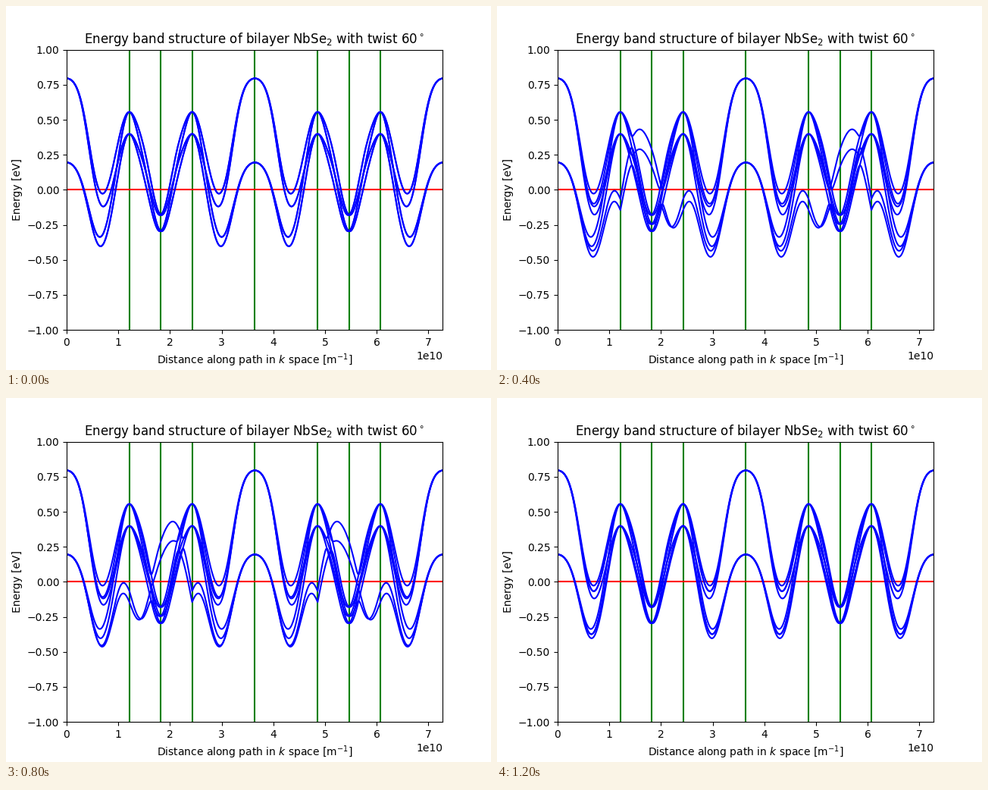
Animation, 640 px wide and 480 px high, one loop 1300 ms. Source, as a matplotlib script:

```python
import numpy as np
import matplotlib.pyplot as plt
from matplotlib.animation import FuncAnimation

A = 3.45e-10                 # lattice constant [m]
K = 4 * np.pi / 3            # length of Gamma-K in units of 1/A
STEPS, TWIST = 13, 60
SPIN_ORBIT, INTERLAYER = 0.0784, 0.3         # [eV]
R3 = np.sqrt(3)

# Three-orbital hoppings up to third neighbours [eV]
e0, e1 = 1.4466, 1.8496
t0, t1, t2, t11, t12, t22 = -0.2308, 0.3116, 0.3459, 0.2795, 0.2787, -0.0539
r0, r1, r2, r11, r12 = 0.0037, -0.0997, 0.0385, 0.0320, 0.0986
u0, u1, u2, u11, u12, u22 = 0.0685, -0.0381, 0.0535, 0.0601, -0.0179, -0.0425


def layer(k, spin):
    """Monolayer Hamiltonian for the orbitals z2, xy and x2-y2."""
    a, b = k.real / 2, R3 * k.imag / 2
    ca, c2a, c3a, c4a = (np.cos(n * a) for n in (1, 2, 3, 4))
    sa, s2a, s3a = (np.sin(n * a) for n in (1, 2, 3))
    cb, c2b, sb, s2b = np.cos(b), np.cos(2 * b), np.sin(b), np.sin(2 * b)

    h = np.zeros((len(k), 3, 3), complex)
    h[:, 0, 0] = (e0 + 2 * t0 * (2 * ca * cb + c2a)
                  + 2 * r0 * (2 * c3a * cb + c2b)
                  + 2 * u0 * (2 * c2a * c2b + c4a))
    h[:, 0, 1] = (-2 * R3 * t2 * sa * sb + 2 * (r1 + r2) * s3a * sb
                  - 2 * R3 * u2 * s2a * s2b
                  + 1j * (2 * t1 * sa * (2 * ca + cb)
                          + 2 * (r1 - r2) * s3a * cb
                          + 2 * u1 * s2a * (2 * c2a + c2b)))
    h[:, 0, 2] = (2 * t2 * (c2a - ca * cb)
                  - 2 / R3 * (r1 + r2) * (c3a * cb - c2b)
                  + 2 * u2 * (c4a - c2a * c2b)
                  + 1j * (2 * R3 * t1 * ca * sb
                          + 2 / R3 * (r1 - r2) * sb * (c3a + 2 * cb)
                          + 2 * R3 * u1 * c2a * s2b))
    h[:, 1, 1] = (e1 + (t11 + 3 * t22) * ca * cb + 2 * t11 * c2a
                  + 4 * r11 * c3a * cb + 2 * (r11 + R3 * r12) * c2b
                  + (u11 + 3 * u22) * c2a * c2b + 2 * u11 * c4a)
    h[:, 2, 2] = (e1 + (3 * t11 + t22) * ca * cb + 2 * t22 * c2a
                  + 2 * r11 * (2 * c3a * cb + c2b)
                  + 2 / R3 * r12 * (4 * c3a * cb - c2b)
                  + (3 * u11 + u22) * c2a * c2b + 2 * u22 * c4a)
    h[:, 1, 2] = (R3 * (t22 - t11) * sa * sb + 4 * r12 * s3a * sb
                  + R3 * (u22 - u11) * s2a * s2b
                  + 1j * (4 * t12 * sa * (ca - cb)
                          + 4 * u12 * s2a * (c2a - c2b))
                  - 1j * spin * SPIN_ORBIT)
    for i, j in ((0, 1), (0, 2), (1, 2)):
        h[:, j, i] = h[:, i, j].conj()
    return h


def bands(k, deg):
    """Lowest two bands per spin of two z2-coupled layers, one twisted."""
    q = k * np.exp(-1j * np.radians(deg))
    out = []
    for spin in (1, -1):
        h = np.zeros((len(k), 6, 6), complex)
        h[:, :3, :3] = layer(k, spin)
        h[:, 3:, 3:] = layer(q, spin)
        h[:, 0, 3] = h[:, 3, 0] = INTERLAYER
        out.append(np.linalg.eigvalsh(h)[:, :2])
    return np.hstack(out)


# Gamma-K-K'-Gamma and back again, 100 points per side
s = np.arange(600) / 100
u = np.minimum(s, 6 - s)
stops = K * np.array([0, 1, np.exp(1j * np.pi / 3), 0])
path = np.interp(u, range(4), stops.real) + 1j * np.interp(u, range(4), stops.imag)
x = s * K / A

fig, ax = plt.subplots(figsize=(6.4, 4.8), dpi=100)
for p in (1, 1.5, 2, 3, 4, 4.5, 5):
    ax.axvline(p * K / A, color='g')
ax.axhline(0, color='r')
aligned = bands(path, 0)
ax.plot(x, aligned, 'b')
lines = ax.plot(x, aligned, 'b')
ax.set_xlim(0, x[-1])
ax.set_ylim(-1, 1)
ax.set_xlabel('Distance along path in $k$ space [m$^{-1}$]')
ax.set_ylabel('Energy [eV]')
ax.set_title(r'Energy band structure of bilayer NbSe$_2$ with twist 60$^\circ$')


def update(i):
    for line, e in zip(lines, bands(path, i * TWIST / (STEPS - 1)).T):
        line.set_ydata(e)
    return lines


anim = FuncAnimation(fig, update, frames=STEPS, interval=100, repeat=True,
                     repeat_delay=0)
plt.show()
```
